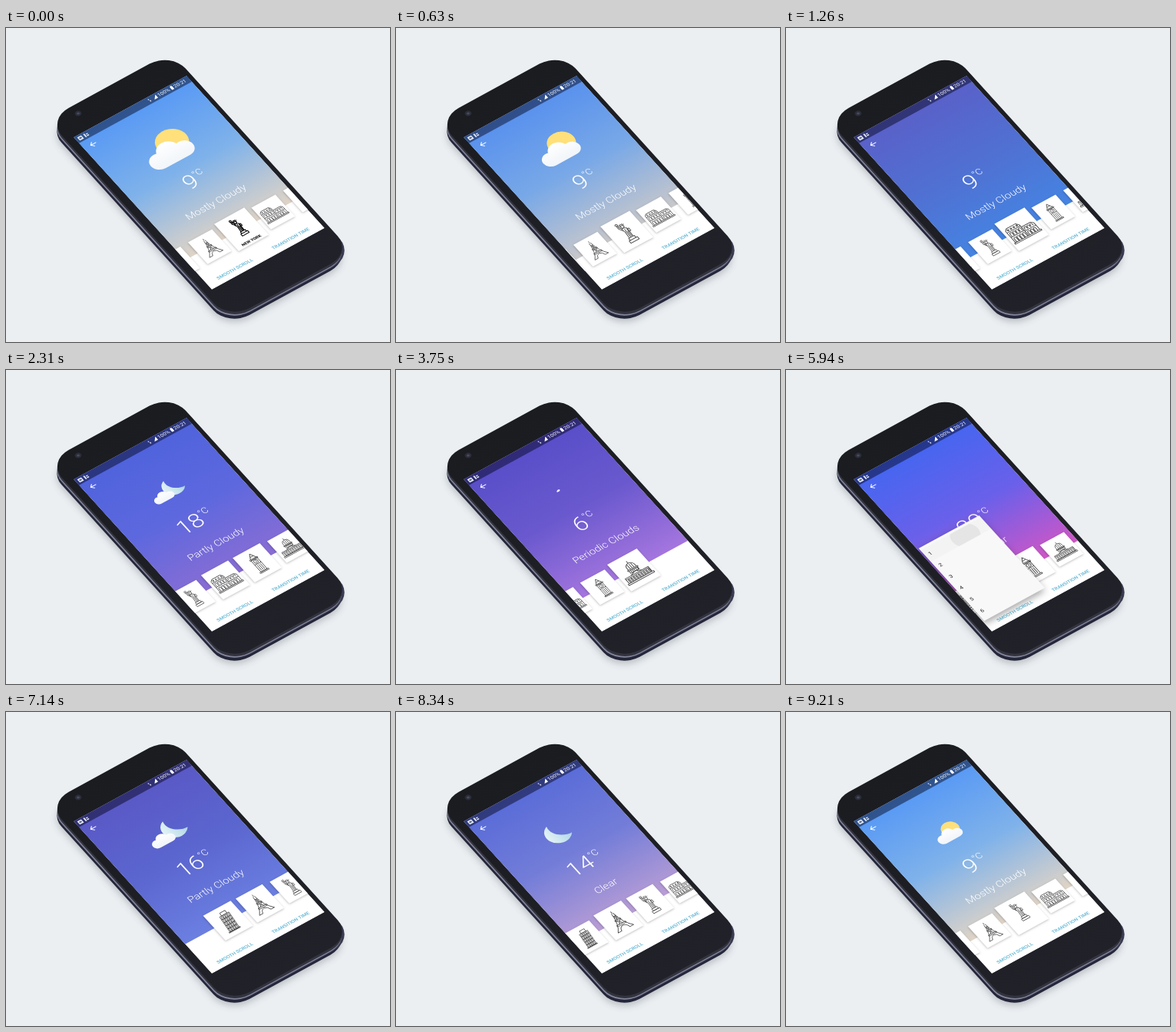
An HTML page with a canvas for the animation above (9240 ms loop, 500 px wide and 408 px high).

```html
<!DOCTYPE html>
<html>
<head>
<meta charset="utf-8">
<style>
html, body { margin: 0; width: 100%; height: 100%; overflow: hidden; background: #ebeff2; }
canvas { display: block; }
</style>
</head>
<body>
<canvas id="c" width="500" height="408"></canvas>
<script>
const g = document.getElementById('c').getContext('2d');
const LOOP = 9240, W = 360, H = 640, PANEL = 516, PITCH = 101;
const clamp = x => Math.min(1, Math.max(0, x));
const smooth = x => (x = clamp(x), x * x * (3 - 2 * x));

// Sky colours from top to bottom
const SKY = {
  mostly: ['5698f5', '7fb2ea', 'e0d4c6'],
  partly: ['5a60c8', '5070d2', '4484e2'],
  periodic: ['4466f0', '6a60ea', 'd056c6'],
  clear: ['5a4cc4', '6a58cc', 'a078e0']
};
const CITIES = [
  ['PISA', 16, 'Partly Cloudy', 'partly', pisa],
  ['PARIS', 14, 'Clear', 'clear', eiffel],
  ['NEW YORK', 9, 'Mostly Cloudy', 'mostly', liberty],
  ['ROME', 18, 'Partly Cloudy', 'partly', colosseum],
  ['LONDON', 6, 'Periodic Clouds', 'periodic', bigBen],
  ['WASHINGTON', 20, 'Clear', 'clear', capitol]
].map(([name, temp, text, sky, draw]) => ({ name, temp, text, sky, draw }));
// start, duration, from, to
const SCROLLS = [
  [420, 880, 2, 3], [1900, 820, 3, 4], [3050, 850, 4, 5],
  [5760, 550, 5, 0], [6850, 650, 0, 1], [7782, 1268, 1, 2]
];

// The screen lies in an oblique plane; local units are 360 by 640
const plane = (dx = 0, dy = 0) =>
  g.setTransform(147 / W, -80 / W, 180 / H, 198 / H, 88 + dx, 142 + dy);
const shadow = (color, blur, dy) => {
  g.shadowColor = color; g.shadowBlur = blur; g.shadowOffsetY = dy;
};
const noShadow = () => shadow('transparent', 0, 0);
const font = (size, weight = 400) => g.font = `${weight} ${size}px Roboto, sans-serif`;
function text(s, x, y, size, weight, color, align = 'center') {
  font(size, weight);
  g.fillStyle = color;
  g.textAlign = align;
  g.fillText(s, x, y);
}
function rect(x, y, w, h, color) {
  g.fillStyle = color;
  g.fillRect(x, y, w, h);
}

// Path helpers
function line(...p) {
  g.moveTo(p[0], p[1]);
  for (let i = 2; i < p.length; i += 2) g.lineTo(p[i], p[i + 1]);
}
function dot(x, y, r) {
  g.moveTo(x + r, y);
  g.arc(x, y, r, 0, 7);
}
function arch(x, y, w, h) {
  g.moveTo(x, y + h);
  g.arc(x + w / 2, y + w / 2, w / 2, Math.PI, 0);
  g.lineTo(x + w, y + h);
}

// Landmarks in a 100 by 100 box
function pisa() {
  g.transform(1, 0, -.12, 1, 6, 0);
  g.rect(40, 6, 22, 14);
  for (let i = 0; i < 5; i++) {
    const y = 20 + i * 15;
    g.rect(32, y, 38, 15);
    for (let x = 36; x < 66; x += 8) arch(x, y + 4, 6, 11);
  }
  g.rect(28, 95, 46, 3);
}
function eiffel() {
  line(50, 2, 50, 12);
  for (const s of [-1, 1]) {
    g.moveTo(50 + 3 * s, 12);
    g.quadraticCurveTo(50 + 7 * s, 66, 50 + 32 * s, 95);
    g.lineTo(50 + 17 * s, 95);
    g.quadraticCurveTo(50 + 14 * s, 78, 50, 76);
  }
  g.rect(39, 44, 22, 5);
  g.rect(32, 66, 36, 6);
  line(46, 24, 54, 34, 46, 44);
  line(54, 24, 46, 34, 54, 44);
  line(43, 49, 58, 66);
  line(57, 49, 42, 66);
}
function liberty() {
  g.rect(34, 86, 32, 11);
  g.rect(39, 76, 22, 10);
  line(42, 76, 45, 46, 40, 34, 50, 30, 59, 36, 57, 76);
  line(50, 36, 48, 76);
  line(54, 48, 53, 76);
  dot(50, 24, 5.5);
  for (let a = -2.6; a < -.4; a += .5)
    line(50 + 6 * Math.cos(a), 22 + 6 * Math.sin(a), 50 + 12 * Math.cos(a), 22 + 12 * Math.sin(a));
  line(45, 40, 35, 26, 35, 13, 39, 13, 40, 25, 45, 32);
  dot(37, 8, 4);
  g.rect(57, 40, 7, 12);
}
function colosseum() {
  line(4, 84, 4, 28, 12, 20, 46, 20, 54, 30, 54, 84);
  line(54, 42, 88, 42, 96, 50, 96, 84);
  g.rect(0, 84, 100, 5);
  for (const y of [36, 58]) line(4, y, 54, y);
  line(54, 62, 96, 62);
  for (let i = 0; i < 4; i++) {
    const x = 9 + i * 11;
    g.rect(x + 2, 26, 4, 5);
    arch(x, 41, 8, 14);
    arch(x, 64, 8, 20);
    if (i < 3) {
      arch(x + 50, 47, 8, 11);
      arch(x + 50, 67, 8, 17);
    }
  }
}
function bigBen() {
  g.rect(37, 30, 26, 62);
  g.rect(34, 26, 32, 5);
  line(38, 26, 43, 16, 50, 2, 57, 16, 62, 26);
  line(43, 16, 57, 16);
  dot(50, 42, 8);
  line(50, 37, 50, 42, 54, 43);
  line(37, 54, 63, 54);
  for (const x of [43.5, 50, 56.5]) line(x, 58, x, 88);
  g.rect(32, 92, 36, 5);
}
function capitol() {
  line(50, 6, 50, 16);
  arch(35, 16, 30, 25);
  for (const x of [43, 50, 57]) line(x, 20, x, 41);
  g.rect(31, 41, 38, 4);
  g.rect(34, 45, 32, 11);
  for (let x = 40; x < 66; x += 6) line(x, 45, x, 56);
  line(28, 64, 50, 55, 72, 64);
  g.rect(6, 64, 88, 24);
  line(6, 69, 94, 69);
  for (let x = 12; x < 94; x += 9.5) g.rect(x, 73, 4, 15);
  g.rect(1, 88, 98, 6);
}

// Weather pictures around their centre
function cloud(x, y, s) {
  g.save();
  g.translate(x, y);
  g.scale(s, s);
  g.beginPath();
  dot(-43, 24, 28);
  dot(-4, 8, 33);
  dot(35, 25, 27);
  g.rect(-43, 20, 78, 32);
  const fill = g.createLinearGradient(0, -25, 0, 52);
  fill.addColorStop(0, '#ffffff');
  fill.addColorStop(1, '#f1f5f9');
  g.fillStyle = fill;
  g.fill();
  g.restore();
}
function moon(x, y, r) {
  const horn = -1.95;
  g.beginPath();
  g.arc(x, y, r, horn, .6, true);
  g.bezierCurveTo(x + r * .25, y + r * .6, x - r * .65, y, x + r * Math.cos(horn), y + r * Math.sin(horn));
  const fill = g.createLinearGradient(x - r, y, x + r, y);
  fill.addColorStop(0, '#e4f3f5');
  fill.addColorStop(1, '#a9d3e6');
  g.fillStyle = fill;
  g.fill();
}
function weather(sky) {
  if (sky == 'mostly') {
    g.beginPath();
    dot(21, -12, 45);
    g.fillStyle = '#ffe07a';
    g.fill();
    cloud(0, 0, 1);
  } else if (sky == 'partly') {
    moon(40, -10, 62);
    cloud(-40, 8, .9);
  } else if (sky == 'clear') {
    moon(0, 0, 62);
  } else {
    g.globalAlpha = .7;
    cloud(25, -18, .7);
    g.globalAlpha = 1;
    cloud(-5, 4, .9);
  }
}

function mix(a, b, p) {
  const part = (hex, i) => parseInt(hex.substr(i, 2), 16);
  return `rgb(${[0, 2, 4].map(i => part(a, i) + (part(b, i) - part(a, i)) * p)})`;
}

function stateAt(t) {
  let s = { at: 2, cur: 2, next: 2, p: 0, since: 1e4, moving: false };
  for (const [start, len, from, to] of SCROLLS) {
    if (t < start) break;
    const k = smooth((t - start) / len), at = from + (to - from) * k;
    if (t < start + len) {
      s = { at, cur: from, next: from + Math.sign(to - from),
        p: clamp(Math.abs(at - from)), since: t - start, moving: true };
    } else {
      s = { at: to, cur: to, next: to, p: 0, since: t - start - len, moving: false };
    }
  }
  return s;
}

function drawPhone() {
  const body = color => {
    g.beginPath();
    g.roundRect(-22, -90, 394, 840, 68);
    g.fillStyle = color;
    g.fill();
  };
  plane(-.5, 9);
  shadow('rgba(70,75,85,.3)', 10, 4);
  body('#25263a');
  noShadow();
  plane(3, 4);
  body('#3a3b52');
  plane(-.5, 5);
  body('#83869a');
  plane(0, 3.2);
  body('#33343f');
  plane();
  const face = g.createLinearGradient(0, -90, 0, 750);
  face.addColorStop(0, '#1b1c20');
  face.addColorStop(1, '#212229');
  body(face);
  g.beginPath();
  dot(56, -60, 9);
  g.fillStyle = '#2b2d38';
  g.fill();
  g.beginPath();
  dot(56, -60, 4);
  g.fillStyle = '#454a5c';
  g.fill();
}

function drawStatus() {
  rect(0, 0, W, 25, 'rgba(0,0,20,.46)');
  rect(7, 6, 13, 13, '#e8eef4');
  rect(10, 10, 7, 5, '#5a6a88');
  rect(26, 6, 4, 13, '#e8eef4');
  rect(32, 9, 6, 3, '#e8eef4');
  rect(32, 14, 6, 4, '#e8eef4');
  text('20:21', 331, 17, 15, 400, '#fff');
  text('100%', 279, 17, 15, 400, '#fff');
  rect(302, 6, 7, 12, '#fff');
  rect(304, 4, 3, 2, '#fff');
  g.beginPath();
  line(246, 18, 257, 18, 257, 5);
  g.fillStyle = '#fff';
  g.fill();
  rect(231, 7, 3, 4, '#dde');
  rect(233, 13, 3, 5, '#dde');
  g.beginPath();
  line(38, 49, 21, 49);
  line(29, 41, 21, 49, 29, 57);
  g.lineWidth = 2.4;
  g.strokeStyle = '#fff';
  g.stroke();
}

function drawCard(city, offset, shrink, label) {
  const scale = 1 - .2 * Math.min(1, Math.abs(offset));
  g.save();
  g.translate(180 + offset * PITCH, PANEL);
  g.scale(scale, scale);
  shadow('rgba(0,0,0,.25)', 3, 1);
  rect(-48, -57, 96, 114, '#fff');
  noShadow();
  if (label) text(city.name, 0, 50, 12, 700, '#000');
  g.translate(0, -57 * .2 * shrink);
  const size = .84 * (1 - .2 * shrink);
  g.scale(size, size);
  g.translate(-50, -50);
  g.beginPath();
  city.draw();
  g.lineWidth = label ? 3.6 : 2.5;
  g.lineJoin = 'round';
  g.strokeStyle = label ? '#000' : '#484848';
  g.stroke();
  g.restore();
}

function drawPopup(t) {
  const open = smooth((t - 4860) / 300), close = clamp((t - 5960) / 150);
  const alpha = open * (1 - close);
  // Press on the left button
  const press = (t - 4740) / 450;
  if (press > 0 && press < 1) {
    g.beginPath();
    g.ellipse(89, 618, 25 + 50 * press, 18, 0, 0, 7);
    g.fillStyle = `rgba(0,0,0,${.12 * (1 - press)})`;
    g.fill();
  }
  if (!alpha) return;
  g.save();
  g.globalAlpha = alpha;
  const x = 5, y = 294, w = 193, h = 304, s = .6 + .4 * open;
  g.translate(x, y + h);
  g.scale(s, s);
  g.translate(-x, -y - h);
  shadow('rgba(0,0,0,.35)', 10, 4);
  rect(x, y, w, h, '#f8f8f8');
  noShadow();
  g.save();
  g.beginPath();
  g.rect(x, y + 8, w, 48);
  g.clip();
  const tap = (t - 5760) / 300;
  if (tap > 0) {
    rect(x, y, w, 60, 'rgba(0,0,0,.02)');
    g.beginPath();
    dot(130, 328, 15 + 42 * clamp(tap));
    g.fillStyle = 'rgba(0,0,0,.06)';
    g.fill();
  }
  g.restore();
  for (let i = 0; i < 6; i++) text(i + 1, 20, 331 + 48 * i, 16, 400, '#222');
  g.restore();
}

function drawScreen(t) {
  const s = stateAt(t), city = CITIES[s.cur], next = CITIES[s.next];
  g.save();
  g.beginPath();
  g.rect(0, 0, W, H);
  g.clip();
  rect(0, 0, W, H, '#fff');
  const sky = g.createLinearGradient(0, 0, 0, PANEL);
  SKY[city.sky].forEach((c, i) => sky.addColorStop(i / 2, mix(c, SKY[next.sky][i], s.p)));
  rect(0, 0, W, PANEL, sky);
  drawStatus();

  // Weather picture
  const size = s.moving ? 1 - s.p : smooth(s.since / 300);
  if (size > .01) {
    g.save();
    g.translate(180, 176);
    g.scale(size, size);
    weather(city.sky);
    g.restore();
  }

  // Temperature with a raised unit, centred together
  font(66, 300);
  const wide = g.measureText(city.temp).width;
  font(28, 300);
  const left = 177 - (wide + g.measureText('°C').width) / 2;
  text(city.temp, left, 327, 66, 300, '#fff', 'left');
  text('°C', left + wide, 298, 28, 300, '#fff', 'left');
  text(city.text, 178, 410, 30, 300, '#fff');

  const settled = clamp(s.since / 200), shrink = s.moving ? 1 - settled : settled;
  CITIES.forEach((c, i) => {
    const mine = i == s.cur;
    drawCard(c, i - s.at, mine ? shrink : 0, mine && !s.moving && shrink == 1);
  });
  text('SMOOTH SCROLL', 89, 622, 14, 500, '#5cb3d1');
  text('TRANSITION TIME', 267, 622, 14, 500, '#5cb3d1');
  drawPopup(t);
  g.restore();
}

function frame() {
  const t = performance.now() % LOOP;
  g.resetTransform();
  rect(0, 0, 500, 408, '#ebeff2');
  drawPhone();
  drawScreen(t);
  requestAnimationFrame(frame);
}
frame();
</script>
</body>
</html>
```
